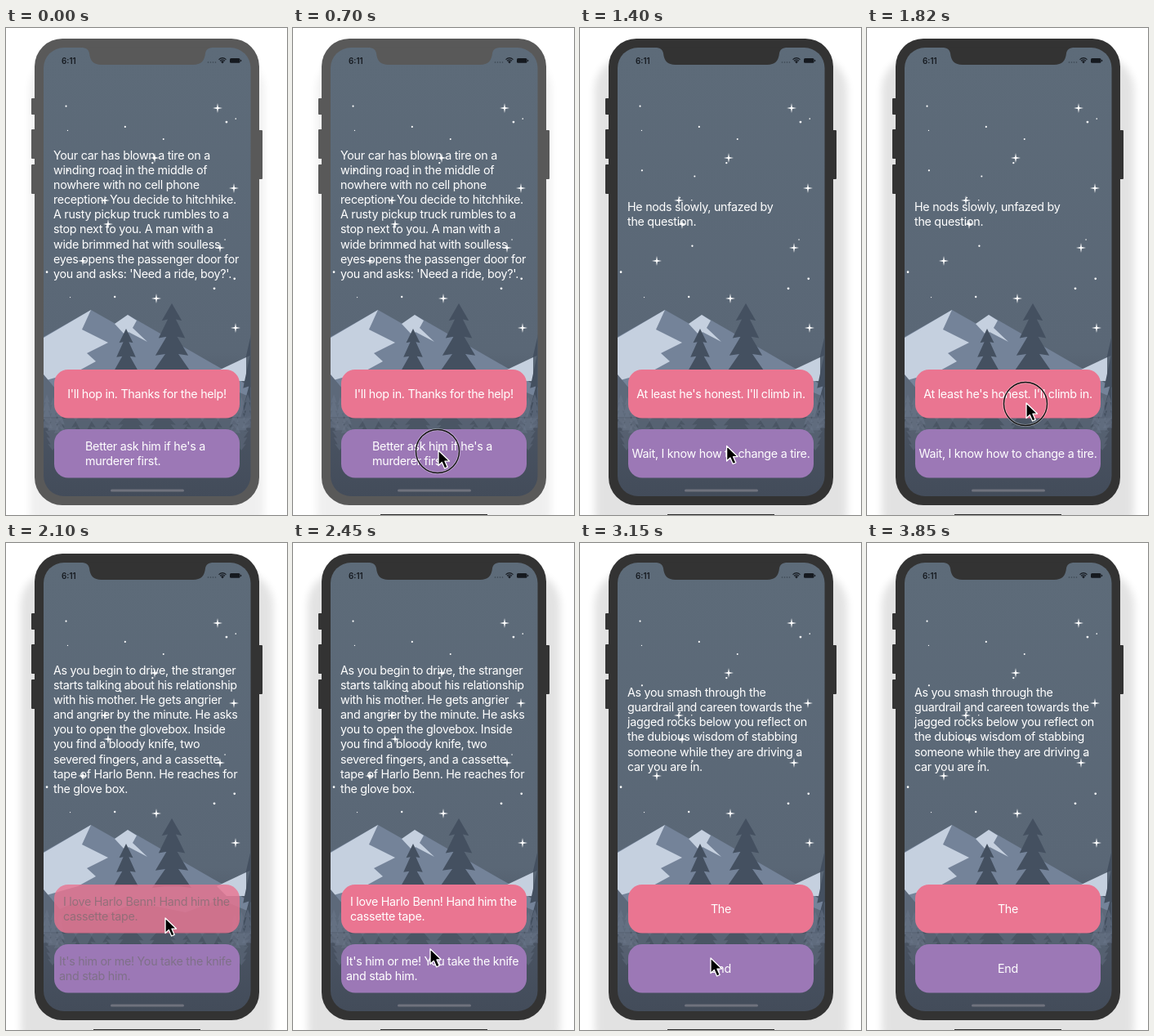
These frames come from a looping animation (344x596 px, 4.06 s). An HTML page:

```html
<!DOCTYPE html>
<html lang="en">
<head>
<meta charset="utf-8">
<title>Hitchhiker story</title>
<style>
html, body { margin: 0; width: 100%; height: 100%; overflow: hidden; background: #fff; }
svg { display: block; width: 344px; height: 596px; }
text { font-family: Inter, "Liberation Sans", sans-serif; font-size: 14.3px; letter-spacing: -.28px; fill: #fff; white-space: pre; }
#clock { font-size: 9.8px; font-weight: 600; letter-spacing: 0; fill: #15191f; }
</style>
</head>
<body>
<svg viewBox="0 0 344 596">
  <defs>
    <linearGradient id="sky" x1="0" y1="0" x2="0" y2="1">
      <stop offset="0" stop-color="#5d6b79"/>
      <stop offset=".68" stop-color="#5a6776"/>
      <stop offset=".83" stop-color="#4a5463"/>
      <stop offset="1" stop-color="#434c5a"/>
    </linearGradient>
    <filter id="blur" x="-20%" y="-20%" width="140%" height="140%"><feGaussianBlur stdDeviation="5"/></filter>
    <clipPath id="screen"><rect x="46" y="24" width="253.5" height="549" rx="25"/></clipPath>
  </defs>

  <rect id="shadow" y="34" height="600" rx="42" filter="url(#blur)"/>
  <g id="body">
    <rect x="31" y="86" width="6" height="20" rx="1"/>
    <rect x="31" y="124" width="6" height="36" rx="1"/>
    <rect x="31" y="167" width="6" height="36" rx="1"/>
    <rect x="308" y="125" width="6" height="60" rx="1"/>
    <rect x="35" y="13" width="275" height="571" rx="34"/>
  </g>

  <g clip-path="url(#screen)">
    <rect x="46" y="24" width="254" height="549" fill="url(#sky)"/>
    <path fill="#748399" d="M46 378L104 345L134 362L149 351L264 417L300 440V478H46Z"/>
    <g fill="#c5d0df">
      <path d="M46 379L104 345L93 369L125 385L99 398L110 408L88 420L46 432Z"/>
      <path d="M133 362L149 351L160 358L155 367L173 384L150 372L146 376Z"/>
      <path d="M258 420L294 403V432H270Z"/>
    </g>
    <path fill="#5d697a" d="M46 424L66 448L84 440L120 455L160 440L220 452L262 436L300 452V484H46Z"/>
    <rect x="46" y="476" width="254" height="14" fill="#4a5564"/>
    <g id="pines"></g>
    <g id="stars" fill="#fff"></g>
    <rect x="128" y="564.5" width="90" height="3" rx="1.5" fill="#6f727d"/>
  </g>

  <path id="notch" d="M90 23.5C98 24 101 26 102 31C103 40 107 45 117 45H229C239 45 243 40 244 31C245 26 248 24 256 23.5Z"/>
  <text id="clock" x="68" y="43.5">6:11</text>
  <g fill="#15191f">
    <path d="M247.5 42H258" stroke="#15191f" stroke-opacity=".45" stroke-width="1.6" stroke-linecap="round" stroke-dasharray="0 3"/>
    <path d="M265 43.5L263 41Q265 39.5 267 41Z"/>
    <path d="M260.5 38.6Q265 34.6 269.5 38.6M262 40.3Q265 37.6 268 40.3" fill="none" stroke="#15191f" stroke-width="1.2"/>
    <rect x="274" y="37" width="12.5" height="5.8" rx="1.6"/>
    <rect x="287" y="38.8" width="1.2" height="2.2" rx=".6"/>
  </g>

  <g id="story"></g>
  <rect id="pink" x="59" y="418" width="227" height="59.5" rx="17" fill="#ea7591"/>
  <g id="pinkText"></g>
  <rect id="purple" x="59" y="491" width="227" height="59.5" rx="17" fill="#9c78b6"/>
  <g id="purpleText"></g>

  <rect id="strip" x="107" y="595" width="131" height="2" fill="#2b2b2b"/>
  <g id="ring" fill="none">
    <circle r="26.5" stroke="#fff" stroke-opacity=".4" stroke-width="3"/>
    <circle r="26.5" stroke="#111" stroke-width="1.4"/>
  </g>
  <path id="cursor" d="M0 0V18.5L4.3 14.5L7.6 22L11.2 20.4L8 13.2L13.5 13Z" fill="#000" stroke="#fff" stroke-width="1.3" stroke-linejoin="round"/>
</svg>

<script>
const LOOP = 4060, STEP = 70, LAST = 3850;
const FADE = 140, SWAP = 210, TRAVEL = 420;
const $ = id => document.getElementById(id);

// Each scene ends when its button `tap` is pressed at `down`; `lag` delays its button text
const scenes = [
  { story: ["Your car has blown a tire on a", "winding road in the middle of", "nowhere with no cell phone",
      "reception. You decide to hitchhike.", "A rusty pickup truck rumbles to a", "stop next to you. A man with a",
      "wide brimmed hat with soulless", "eyes opens the passenger door for", "you and asks: 'Need a ride, boy?'."],
    pink: ["I'll hop in. Thanks for the help!"],
    purple: ["Better ask him if he's a", "murderer first."], purpleX: 97,
    tap: "purple", down: 700 },
  { story: ["He nods slowly, unfazed by", "the question."],
    pink: ["At least he's honest. I'll climb in."],
    purple: ["Wait, I know how to change a tire."],
    tap: "pink", down: 1820, lag: 80 },
  { story: ["As you begin to drive, the stranger", "starts talking about his relationship",
      "with his mother. He gets angrier", "and angrier by the minute. He asks", "you to open the glovebox. Inside",
      "you find a bloody knife, two", "severed fingers, and a cassette", "tape of Harlo Benn. He reaches for", "the glove box."],
    pink: ["I love Harlo Benn! Hand him the", "cassette tape."], pinkX: 70,
    purple: ["It's him or me! You take the knife", "and stab him."], purpleX: 65,
    tap: "purple", down: 2660, lag: 35 },
  { story: ["As you smash through the", "guardrail and careen towards the", "jagged rocks below you reflect on",
      "the dubious wisdom of stabbing", "someone while they are driving a", "car you are in."],
    pink: ["The"], purple: ["End"], down: Infinity, lag: 35 }
];

// Cursor stops with the time of arrival
const stops = [
  { x: 215, y: 602, at: 0 }, { x: 178, y: 517, at: 620 }, { x: 195, y: 459, at: 1740 },
  { x: 160, y: 508, at: 2580 }, { x: 166, y: 604, at: 3800 }
];

const clamp = k => Math.max(0, Math.min(1, k));
const mix = (a, b, k) => a + (b - a) * k;
const ease = k => k * k * (3 - 2 * k);

function seeded(seed) {
  return () => (seed = seed * 16807 % 2147483647) / 2147483647;
}

function pine(x, tip, h, w, color, tiers = 4, alpha = 1) {
  const left = [], right = [];
  for (let i = 1; i <= tiers; i++) {
    const y = tip + h * i / tiers, half = w * (.35 + .65 * i / tiers);
    left.push(`${x - half} ${y}`, `${x - half * .4} ${y - h * .02}`);
    right.push(`${x + half} ${y}`, `${x + half * .4} ${y - h * .02}`);
  }
  return `<path d="M${x} ${tip}L${right.join("L")}L${left.reverse().join("L")}Z" fill="${color}" opacity="${alpha}"/>`;
}

function drawScenery() {
  const dark = "#445060", pale = "#6b7789", shore = 477;
  let out = pine(147, 368, 52, 15, dark, 3) + pine(203, 337, 85, 24, dark) + pine(302, 366, 112, 15, dark, 3);
  // Small trees at the screen edges, and reflections hanging below the shore
  for (let i = 0; i < 3; i++) {
    out += pine(50 + i * 8, 448 + i * 3, 42, 7, pale, 4, .5) + pine(296 - i * 8, 448 + i * 3, 42, 7, pale, 4, .5);
  }
  for (const middle of [95, 250]) {
    for (let i = -2; i <= 2; i++) {
      const h = 68 - Math.abs(i) * 14;
      out += pine(middle + i * 19, shore + h, -h, 12, pale, 5, .38);
    }
  }
  out += pine(172, shore + 27, -27, 12, pale, 3, .45);
  $("pines").innerHTML = out;

  const sparks = [[259, 98], [182, 159], [279, 196], [121, 211], [125, 240], [262, 269], [94, 285], [184, 331], [281, 367]];
  let sky = sparks.map(([x, y]) => `<path transform="translate(${x} ${y})" d="M0-6L.9-.9L6 0L.9.9L0 6L-.9.9L-6 0L-.9-.9Z"/>`).join("");
  const rand = seeded(29);
  for (let i = 0; i < 18; i++) {
    sky += `<circle cx="${mix(50, 290, rand())}" cy="${mix(95, 345, rand())}" r="${mix(.6, 1.4, rand())}"/>`;
  }
  $("stars").innerHTML = sky;
}

function setLines(id, lines, middle, x) {
  const first = middle + 4.8 - (lines.length - 1) * 9.075;
  const place = x ? `x="${x}"` : `x="172.5" text-anchor="middle"`;
  $(id).innerHTML = lines.map((s, i) => `<text ${place} y="${first + i * 18.15}">${s}</text>`).join("");
}

let shown = null;
function setScene(scene) {
  if (scene === shown) return;
  shown = scene;
  setLines("story", scene.story, 228.5, 58);
  setLines("pinkText", scene.pink, 448.3, scene.pinkX);
  setLines("purpleText", scene.purple, 521.5, scene.purpleX);
}

// A pressed button fades out, then comes back
function buttonAlpha(name, t) {
  const press = scenes.filter(s => s.tap === name && s.down <= t).pop();
  if (!press) return 1;
  const u = t - press.down;
  return Math.max(.03, 1 - u / FADE, clamp((u - FADE) / 175));
}

// Text that is not fully bright shows as grey
function fadeText(id, a) {
  const g = Math.round(mix(70, 255, a));
  $(id).setAttribute("opacity", Math.min(1, a * 3));
  for (const el of $(id).children) el.style.fill = `rgb(${g},${g},${g})`;
}

function placeCursor(t) {
  const i = Math.max(1, stops.findLastIndex(s => s.at - TRAVEL <= t));
  const a = stops[i - 1], b = stops[i];
  const k = ease(clamp((t - b.at + TRAVEL) / TRAVEL));
  const x = mix(a.x, b.x, k), y = mix(a.y, b.y, k);
  const pressing = scenes.some(s => t >= s.down - 70 && t < s.down + 70);
  $("cursor").setAttribute("transform", `translate(${x} ${y})`);
  $("ring").setAttribute("transform", `translate(${x - 1} ${y + 1})`);
  $("ring").setAttribute("visibility", pressing ? "visible" : "hidden");
}

function setWindow(active) {
  const metal = active ? "#333" : "#595959", spread = active ? 17 : 6;
  $("body").setAttribute("fill", metal);
  $("notch").setAttribute("fill", metal);
  $("shadow").setAttribute("x", 35 - spread);
  $("shadow").setAttribute("width", 275 + spread * 2);
  $("shadow").setAttribute("opacity", active ? .11 : .06);
}

function render(t) {
  const n = scenes.findIndex(s => t < s.down + SWAP), scene = scenes[n];
  const born = n ? scenes[n - 1].down + SWAP + scene.lag : -LOOP;
  setScene(scene);
  for (const name of ["pink", "purple"]) {
    const leaving = scene.tap === name && t > scene.down;
    $(name).setAttribute("opacity", buttonAlpha(name, t));
    fadeText(name + "Text", leaving ? Math.max(.2, 1 - (t - scene.down) / FADE) : clamp((t - born) / 175));
  }
  setWindow(t > scenes[0].down);
  $("strip").setAttribute("visibility", t >= 350 ? "visible" : "hidden");
  placeCursor(t);
}

drawScenery();
const start = performance.now();
function tick() {
  const t = (performance.now() - start) % LOOP;
  render(Math.min(LAST, Math.floor(t / STEP) * STEP));
  requestAnimationFrame(tick);
}
render(0);
requestAnimationFrame(tick);
</script>
</body>
</html>
```
